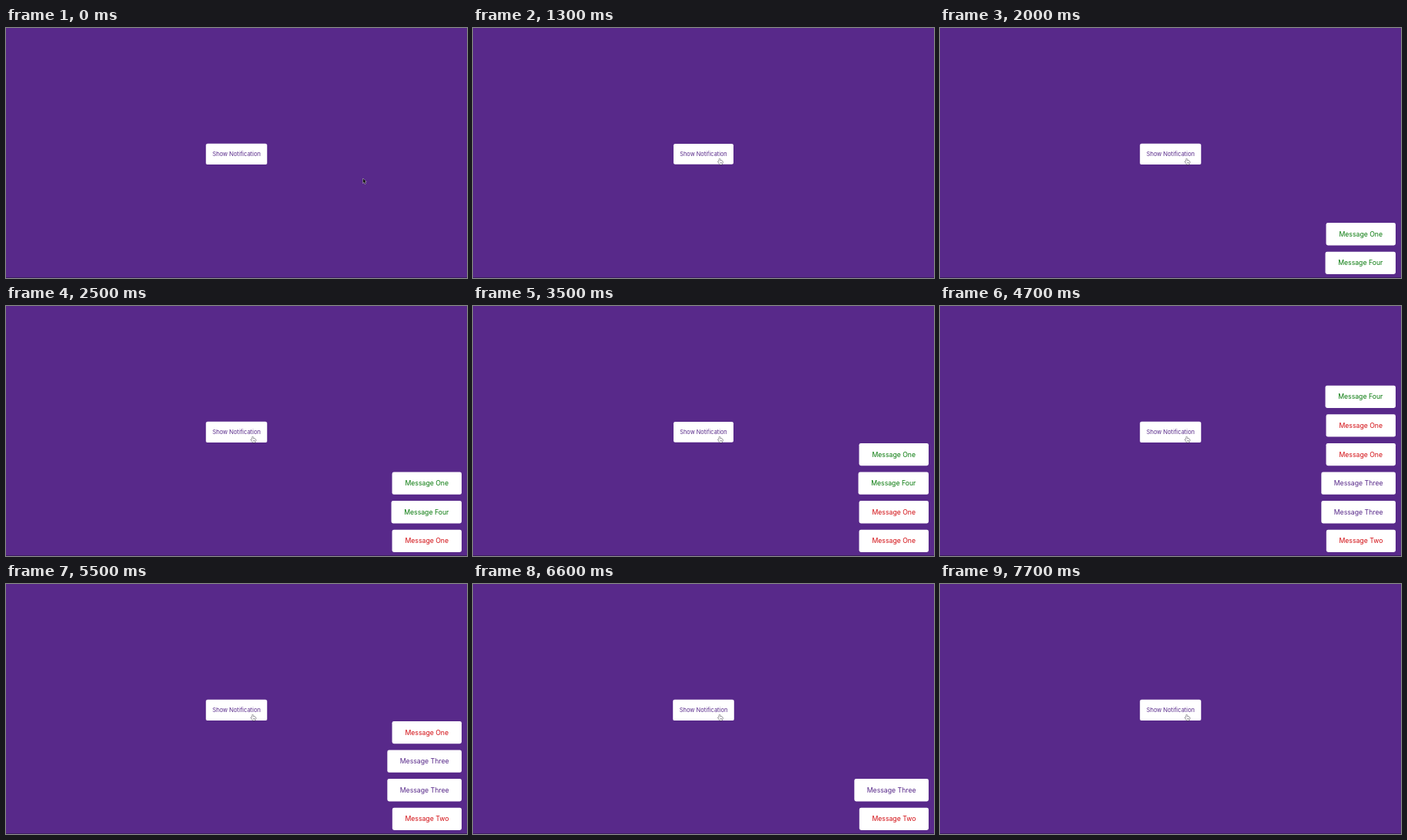
An HTML page with a canvas that plays this animation: 600x326 px, repeating every 8.1 s.

```html
<!DOCTYPE html>
<html lang="en">
<head>
<meta charset="utf-8">
<title>Toast notifications</title>
<style>
  html, body { margin: 0; width: 100%; height: 100%; overflow: hidden; background: #58298a; }
  canvas { display: block; width: 600px; height: 326px; }
</style>
</head>
<body>
<canvas id="stage"></canvas>
<script>
const W = 600, H = 326, LOOP = 8100, LIFE = 3000;
const BG = '#58298a', GREEN = '#087a0c', RED = '#d20d12', PURPLE = '#572889';
const FONT = 'Inter, "Open Sans", sans-serif';

const canvas = document.getElementById('stage');
const ctx = canvas.getContext('2d');
const dpr = window.devicePixelRatio || 1;
canvas.width = W * dpr;
canvas.height = H * dpr;

// left edge of the toast for each message
const LEFT = { One: 502.5, Two: 502.8, Three: 496.3, Four: 501.5 };

// a click holds the button from `down` to `up`; its toast appears on release
const clicks = [
  { down: 1300, up: 1500, word: 'One', color: GREEN },
  { down: 1900, up: 2000, word: 'Four', color: GREEN },
  { down: 2400, up: 2500, word: 'One', color: RED },
  { down: 2900, up: 3100, word: 'One', color: RED },
  { down: 3500, up: 3600, word: 'Three', color: PURPLE },
  { down: 4100, up: 4200, word: 'Three', color: PURPLE },
  { down: 4600, up: 4700, word: 'Two', color: RED }
];

const path = [
  { t: 220, x: 464.6, y: 196.2 },
  { t: 700, x: 281, y: 164.6 },
  { t: 1100, x: 321, y: 170 }
];

const ease = p => p * p * (3 - 2 * p);

function pointerAt(t) {
  if (t <= path[0].t) return path[0];
  for (let i = 1; i < path.length; i++) {
    const a = path[i - 1], b = path[i];
    if (t < b.t) {
      const p = ease((t - a.t) / (b.t - a.t));
      return { x: a.x + (b.x - a.x) * p, y: a.y + (b.y - a.y) * p };
    }
  }
  return path[path.length - 1];
}

function box(x, y, w, h, r) {
  ctx.fillStyle = '#fff';
  ctx.beginPath();
  ctx.roundRect(x, y, w, h, r);
  ctx.fill();
}

function label(text, x, y, size, color) {
  ctx.font = `400 ${size}px ${FONT}`;
  ctx.textAlign = 'center';
  ctx.textBaseline = 'alphabetic';
  ctx.fillStyle = color;
  ctx.fillText(text, x, y);
}

function drawButton(pressed) {
  ctx.save();
  ctx.translate(300, 164.4);
  if (pressed) ctx.scale(0.98, 0.98);
  box(-39.8, -13.7, 79.6, 27.4, 2.2);
  label('Show Notification', 0, 2.5, 7.5, PURPLE);
  ctx.restore();
}

function drawToast({ word, color }, slot) {
  const x = LEFT[word], y = 291.7 - slot * 37.6, w = 593 - x;
  box(x, y, w, 29.3, 2.4);
  label('Message ' + word, x + w / 2, y + 17.6, 8.7, color);
}

function shape(d, fill, stroke, width) {
  const p = new Path2D(d);
  ctx.lineJoin = 'round';
  ctx.lineWidth = width;
  ctx.strokeStyle = stroke;
  ctx.fillStyle = fill;
  ctx.stroke(p);
  ctx.fill(p);
}

const ARROW = 'M0 0V6.1L1.4 4.8L2.5 7.3L3.5 6.8L2.4 4.4H4.3Z';
const HAND = 'M-.7.6Q0-.4.7.6V3Q1.4 2.5 1.9 3.2Q2.6 2.8 3 3.5Q3.8 3.2 3.9 4.2V5.6' +
  'Q3.8 6.6 3.2 7.3V8H-.1V7.4L-2.1 4.6Q-2.2 3.6-1.3 3.9L-.7 4.5Z';

function drawPointer({ x, y }) {
  const over = x > 260 && x < 340 && y > 151 && y < 178;
  ctx.save();
  ctx.translate(x, y);
  if (over) {
    shape(HAND, '#fff', '#33313a', 1);
    ctx.lineWidth = 0.4;
    ctx.stroke(new Path2D('M.9 5V6.7M1.9 5V6.7M2.8 5V6.7'));
  } else {
    shape(ARROW, '#111', '#d8d2df', 0.9);
  }
  ctx.restore();
}

function draw(t) {
  ctx.setTransform(dpr, 0, 0, dpr, 0, 0);
  ctx.fillStyle = BG;
  ctx.fillRect(0, 0, W, H);
  ctx.fillStyle = '#3c1d60';
  ctx.fillRect(0, H - 1, W, 1);

  drawButton(clicks.some(c => t >= c.down && t < c.up));
  const shown = clicks.filter(c => t >= c.up && t < c.up + LIFE);
  shown.forEach((c, i) => drawToast(c, shown.length - 1 - i));
  drawPointer(pointerAt(t));
}

const start = performance.now();
function tick() {
  draw((performance.now() - start) % LOOP);
  requestAnimationFrame(tick);
}
tick();
</script>
</body>
</html>
```
